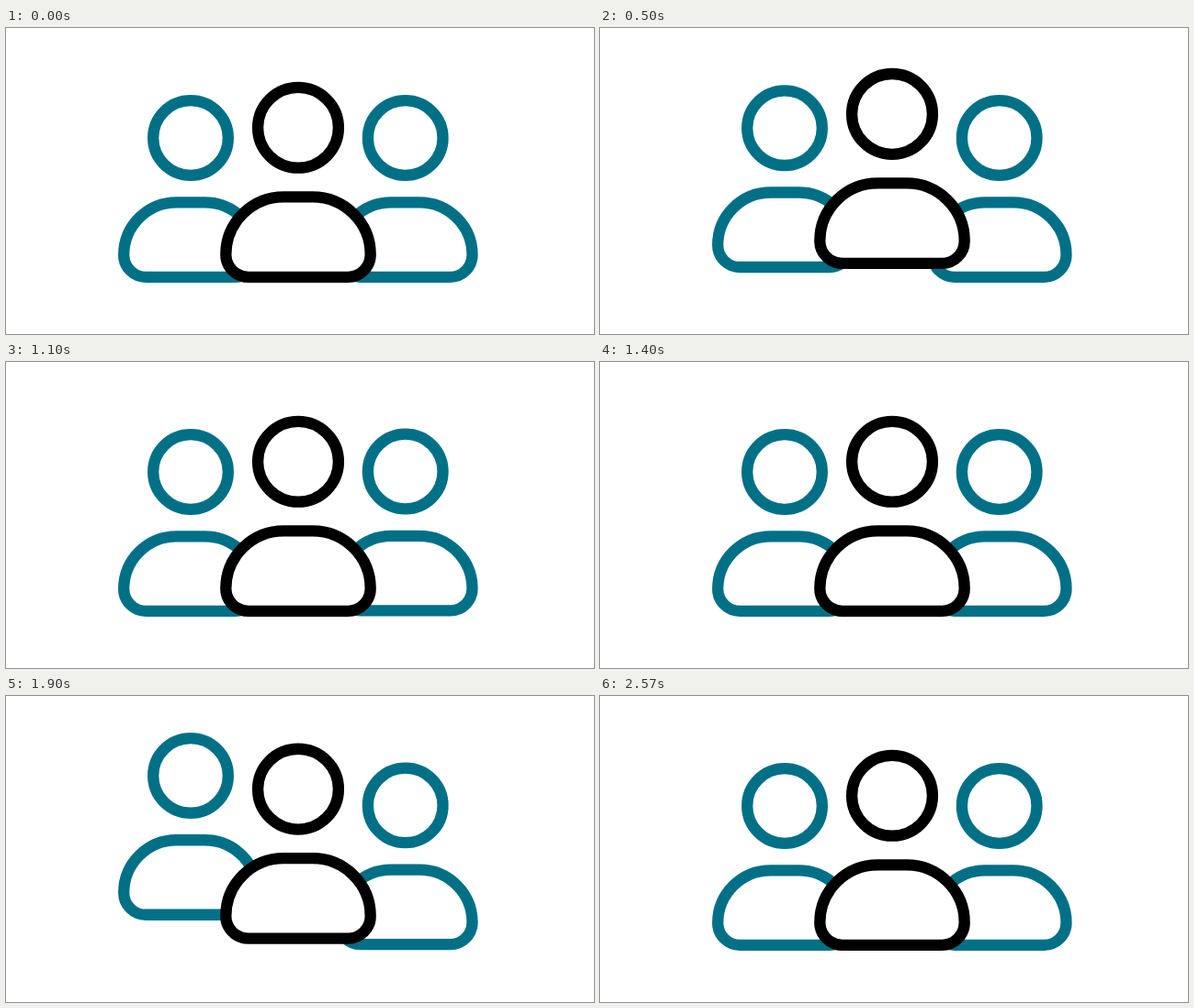
An HTML page that plays this animation: 640 by 334 pixels, repeating every 2610 ms.

```html
<!DOCTYPE html>
<html lang="en">
<head>
<meta charset="utf-8">
<title>Team</title>
<style>
  html, body { margin: 0; width: 100%; height: 100%; overflow: hidden; background: #fff; }
  svg { display: block; width: 100%; height: 100%; }
</style>
</head>
<body>
<svg viewBox="0 0 640 334" fill="#fff" stroke-width="12.3"></svg>
<script>
const LOOP = 2610, CYCLE = LOOP / 2;
const TEAL = '#007087';
const svg = document.querySelector('svg');

// keys: [ms, lift in px] within one cycle
const people = [
  { x: 201, top: 190.3, half: 72.8, arc: 57.5, headY: 120, headR: 40.8, color: TEAL,
    keys: [[429, 0], [624, 35], [828, 0]] },
  { x: 434.7, top: 190.3, half: 72.8, arc: 57.5, headY: 120, headR: 40.8, color: TEAL,
    keys: [[568, 0], [866, 25], [1122, 0]] },
  { x: 318, top: 184.3, half: 78.7, arc: 63, headY: 108.8, headR: 43.9, color: '#000',
    keys: [[100, 0], [295, 12.9], [325, 14.6], [400, 15.3], [500, 14.9], [595, 7.2], [730, 2], [850, 0]] }
];

function add(parent, tag, attrs) {
  const el = document.createElementNS('http://www.w3.org/2000/svg', tag);
  for (const name in attrs) el.setAttribute(name, attrs[name]);
  return parent.appendChild(el);
}

function bodyPath({ x, top, half, arc }) {
  const left = x - half, right = x + half, bottom = 271.8;
  const foot = bottom - top - arc;
  return `M${left + arc} ${top}H${right - arc}A${arc} ${arc} 0 0 1 ${right} ${top + arc}` +
    `A${foot} ${foot} 0 0 1 ${right - foot} ${bottom}H${left + foot}` +
    `A${foot} ${foot} 0 0 1 ${left} ${top + arc}A${arc} ${arc} 0 0 1 ${left + arc} ${top}Z`;
}

// Slope at a key: flat at ends and peaks, harmonic mean elsewhere
function slope(keys, i) {
  if (i === 0 || i === keys.length - 1) return 0;
  const rate = k => (keys[k + 1][1] - keys[k][1]) / (keys[k + 1][0] - keys[k][0]);
  const a = rate(i - 1), b = rate(i);
  return a * b <= 0 ? 0 : 2 * a * b / (a + b);
}

function lift(keys, t) {
  const i = keys.findIndex(key => key[0] > t) - 1;
  if (i < 0) return 0;
  const [t0, y0] = keys[i], [t1, y1] = keys[i + 1];
  const d = t1 - t0, u = (t - t0) / d, v = 1 - u;
  return y0 * v * v * (1 + 2 * u) + y1 * u * u * (3 - 2 * u) +
    d * u * v * (slope(keys, i) * v - slope(keys, i + 1) * u);
}

for (const p of people) {
  p.el = add(svg, 'g', { stroke: p.color });
  add(p.el, 'circle', { cx: p.x, cy: p.headY, r: p.headR });
  add(p.el, 'path', { d: bodyPath(p) });
}

function draw(ms) {
  const t = ms % CYCLE;
  for (const p of people) {
    p.el.setAttribute('transform', `translate(0 ${-lift(p.keys, t).toFixed(2)})`);
  }
}

const start = performance.now();
function tick() {
  draw((performance.now() - start) % LOOP);
  requestAnimationFrame(tick);
}
draw(0);
requestAnimationFrame(tick);
</script>
</body>
</html>
```
